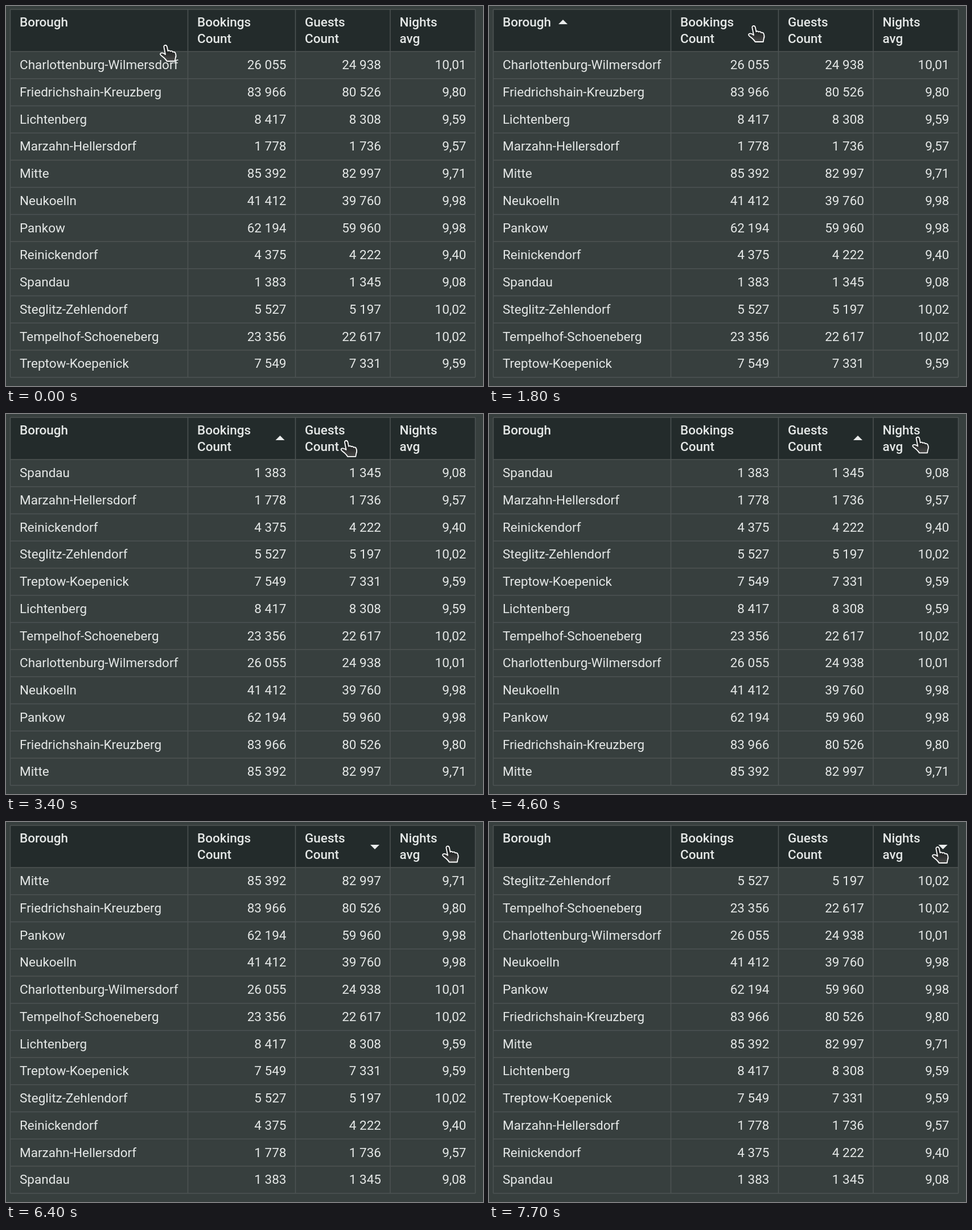
An HTML page for the animation above (9500 ms loop, 838x668 px).

```html
<!DOCTYPE html>
<html lang="en">
<head>
<meta charset="utf-8">
<title>Sortable table</title>
<style>
  html, body { margin: 0; width: 100%; height: 100%; overflow: hidden; background: #373f3e; }
  svg { display: block; width: 838px; height: 668px; }
  text { font: 400 22.5px Roboto, Inter, sans-serif; fill: #e5e8e7; }
  .head { font-weight: 500; }
  .num { text-anchor: end; }
</style>
</head>
<body>
<svg viewBox="0 0 838 668">
  <defs>
    <linearGradient id="skin" x1="0" y1="0" x2="0" y2="1">
      <stop offset=".35" stop-color="#1f2222"/>
      <stop offset="1" stop-color="#4a4a49"/>
    </linearGradient>
  </defs>
  <rect x="7.5" y="6" width="817" height="74" fill="#232b2b"/>
  <path id="grid" fill="none" stroke="#4d5353" stroke-width="1.5"/>
  <g id="heads"></g>
  <g id="rows"></g>
  <path id="arrow" d="M0 8L8 0L16 8Z" fill="#e9ebeb"/>
  <path id="hand" fill="url(#skin)" stroke="#fff" stroke-width="1.8" stroke-linejoin="round"
    d="M7.4 4C7 1.8 8.7.9 10.2.9C11.8 1 12.6 2.2 13 4L14.4 11C15.5 9.9 18 10 18.8 11.6
       C20 10.8 22.3 11 23 12.8C24.6 12.2 27 12.8 27.8 15.2C28.9 18.2 28.9 21 27.7 23.4L26.7 29H12.6
       C11.6 27 9.2 24.6 7.6 23C5 20.6 1.6 19 1 17C.7 15 3 14 5.4 14.7C7.4 15.2 9 16.4 10 17.2Z"/>
</svg>
<script>
const LOOP = 9500, TICK = 100, TOP = 80, PITCH = 47.73;
const edges = [7.5, 319.5, 508.5, 675, 824.5];
const heads = ["Borough", "Bookings Count", "Guests Count", "Nights avg"];
const data = `Charlottenburg-Wilmersdorf|26 055|24 938|10,01
Friedrichshain-Kreuzberg|83 966|80 526|9,80
Lichtenberg|8 417|8 308|9,59
Marzahn-Hellersdorf|1 778|1 736|9,57
Mitte|85 392|82 997|9,71
Neukoelln|41 412|39 760|9,98
Pankow|62 194|59 960|9,98
Reinickendorf|4 375|4 222|9,40
Spandau|1 383|1 345|9,08
Steglitz-Zehlendorf|5 527|5 197|10,02
Tempelhof-Schoeneberg|23 356|22 617|10,02
Treptow-Koepenick|7 549|7 331|9,59`.split("\n").map(line => line.split("|"));

const sorts = [
  { at: 0, col: 0, dir: 0 },
  { at: 1000, col: 0, dir: 1 },
  { at: 2300, col: 1, dir: 1 },
  { at: 4000, col: 2, dir: 1 },
  { at: 5700, col: 2, dir: -1 },
  { at: 7300, col: 3, dir: 1 },
  { at: 7700, col: 3, dir: -1 }
];

// The pointer eases along a curve to each stop, bent towards a control point
const home = [270, 68];
const moves = [
  { at: 0, until: 700, to: [254.5, 39.5], bend: [312, 18] },
  { at: 1400, until: 1800, to: [455, 34], bend: [355, 95] },
  { at: 2400, until: 2700, to: [448, 36] },
  { at: 3000, until: 3600, to: [620, 37], bend: [534, 66] },
  { at: 4200, until: 4800, to: [764, 36], bend: [713, 47] },
  { at: 4900, until: 5400, to: [652, 39], bend: [708, 52] },
  { at: 6000, until: 6400, to: [766, 41.5] },
  { at: 6700, until: 7300, to: [778, 43] }
];

const $ = id => document.getElementById(id);
const add = (parent, tag, attrs, content = "") => {
  const el = document.createElementNS("http://www.w3.org/2000/svg", tag);
  for (const key in attrs) el.setAttribute(key, attrs[key]);
  el.textContent = content;
  return parent.appendChild(el);
};
const place = (el, x, y) => el.setAttribute("transform", `translate(${x} ${y})`);
const ease = p => (1 - Math.cos(Math.PI * p)) / 2;
const curve = (a, b, c, p) => (1 - p) ** 2 * a + 2 * p * (1 - p) * b + p * p * c;

function pointerAt(t) {
  const tick = Math.floor(t / TICK) * TICK;
  let from = home;
  for (const { at, until, to, bend } of moves) {
    if (tick < at) break;
    const start = at ? at - TICK : 0;
    const p = ease(Math.min(1, (tick - start) / (until - start)));
    const mid = bend || from.map((v, i) => (v + to[i]) / 2);
    from = from.map((v, i) => curve(v, mid[i], to[i], p));
  }
  return from;
}

const bottom = TOP + PITCH * data.length;
const lines = [6, ...Array.from({ length: data.length + 1 }, (_, i) => TOP + i * PITCH)];
$("grid").setAttribute("d",
  lines.map(y => `M${edges[0]} ${y}H${edges[4]}`).join("") +
  edges.map(x => `M${x} 6V${bottom}`).join(""));

heads.forEach((title, col) => title.split(" ").forEach((word, i) =>
  add($("heads"), "text", { class: "head", x: edges[col] + 16.5, y: 36.3 + i * 28.7 }, word)));

const rows = data.map(cells => {
  const row = add($("rows"), "g", {});
  cells.forEach((cell, col) => add(row, "text",
    col ? { class: "num", x: edges[col + 1] - 16, y: 31.3 } : { x: 24, y: 31.3 }, cell));
  return row;
});

const value = (i, col) => parseFloat(data[i][col].replace(" ", "").replace(",", "."));

function showSort({ col, dir }) {
  const order = data.map((_, i) => i);
  if (col) order.sort((a, b) => dir * (value(a, col) - value(b, col)));
  order.forEach((i, slot) => place(rows[i], 0, TOP + slot * PITCH));
  const arrow = $("arrow");
  arrow.style.display = dir ? "" : "none";
  const x = col ? edges[col + 1] - 35 : 122;
  const y = col ? 38 : 24;
  arrow.setAttribute("transform", `translate(${x} ${dir < 0 ? y + 10 : y}) scale(1 ${dir || 1})`);
}

let shown;
function draw(now) {
  const t = now % LOOP;
  const sort = sorts.findLast(s => s.at <= t);
  if (sort !== shown) showSort(shown = sort);
  place($("hand"), ...pointerAt(t));
  requestAnimationFrame(() => draw(performance.now() - begin));
}
const begin = performance.now();
draw(0);
</script>
</body>
</html>
```
